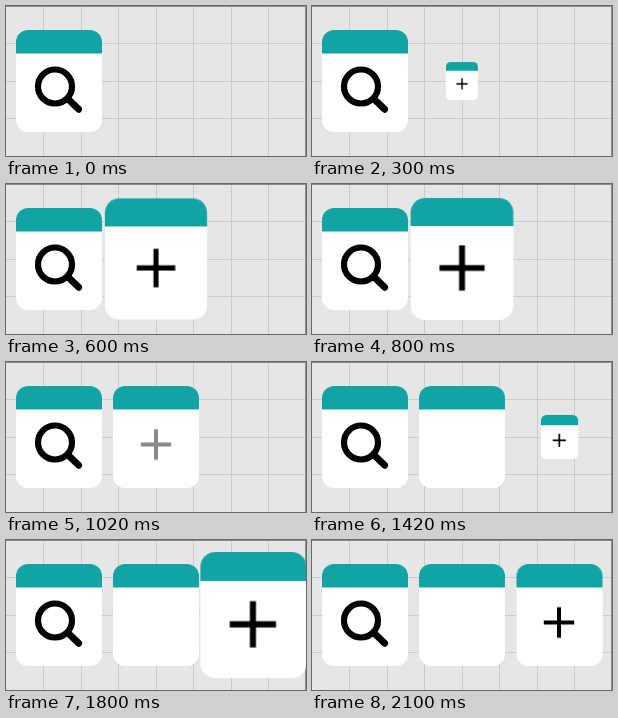
These frames come from a looping animation (300x150 px, 3000 ms). An HTML page:

```html
<!DOCTYPE html>
<html lang="en">
<head>
<meta charset="utf-8">
<title>Cards popping in</title>
<style>
  html, body { margin: 0; width: 100%; height: 100%; overflow: hidden; background: #e6e6e6; }
  svg { display: block; width: 300px; height: 150px; }
  .card, .plus { transform-origin: 0 0; }
  .card { transform: scale(0); }
</style>
</head>
<body>
<svg viewBox="0 0 300 150">
  <defs>
    <g id="panel">
      <rect x="-43" y="-51" width="86" height="102" rx="12" fill="#fff"/>
      <path d="M-43-27.5V-39a12 12 0 0 1 12-12H31a12 12 0 0 1 12 12V-27.5Z" fill="#12a4a5"/>
    </g>
    <path id="cross" d="M-15.2 0H15.2M0-15.2V15.2" stroke="#000" stroke-width="4"/>
  </defs>

  <g id="grid" fill="#cbcbcb"></g>
  <path d="M0 .5H300M299.5 0V150" stroke="#8c8c8c"/>

  <use href="#panel" x="53" y="75"/>
  <g fill="none" stroke="#000" stroke-linecap="round">
    <circle cx="49" cy="80.5" r="17" stroke-width="6.2"/>
    <path d="M62 93L72.7 103.3" stroke-width="6.8"/>
  </g>

  <g transform="translate(150 75)">
    <g class="card"><use href="#panel"/>
      <g transform="translate(0 7.5)"><g class="plus"><use href="#cross"/></g></g>
    </g>
  </g>
  <g transform="translate(247.5 75)">
    <g class="card"><use href="#panel"/>
      <g transform="translate(-.5 7.5)"><g class="plus"><use href="#cross"/></g></g>
    </g>
  </g>
</svg>
<script>
  const LOOP = 3000;
  const EASE = 'cubic-bezier(.55, 0, .55, 1)';
  const NS = 'http://www.w3.org/2000/svg';

  function gridLine(x, y, width, height) {
    const line = document.createElementNS(NS, 'rect');
    Object.entries({ x, y, width, height }).forEach(([k, v]) => line.setAttribute(k, v));
    document.getElementById('grid').append(line);
  }
  for (let i = 1; i < 8; i++) gridLine(Math.floor(i * 37.5), 0, 1, 150);
  for (let i = 1; i < 4; i++) gridLine(0, Math.floor(i * 37.5), 300, 1);

  // steps: [ms, value] pairs; the first and last values hold to the loop's ends
  function track(el, prop, steps, format = v => v, easing = EASE) {
    const all = [[0, steps[0][1]], ...steps, [LOOP, steps.at(-1)[1]]];
    const frames = all.map(([ms, v]) => ({ offset: ms / LOOP, [prop]: format(v), easing }));
    el.animate(frames, { duration: LOOP, iterations: Infinity });
  }

  const scale = v => `scale(${v})`;
  const shift = (steps, by) => steps.map(([ms, v]) => [ms + by, v]);

  const POP = [[0, 0], [700, 1.235], [1000, 1]];
  const PULSE = [[500, 1], [750, 1.255], [1000, 1]];

  const cards = document.querySelectorAll('.card');
  cards.forEach((card, i) => {
    track(card, 'transform', shift(POP, i * 1100), scale);
    track(card.querySelector('.plus'), 'transform', shift(PULSE, i * 1100), scale);
  });
  track(cards[0].querySelector('.plus'), 'opacity', [[930, 1], [1100, 0]], v => v, 'linear');
</script>
</body>
</html>
```
